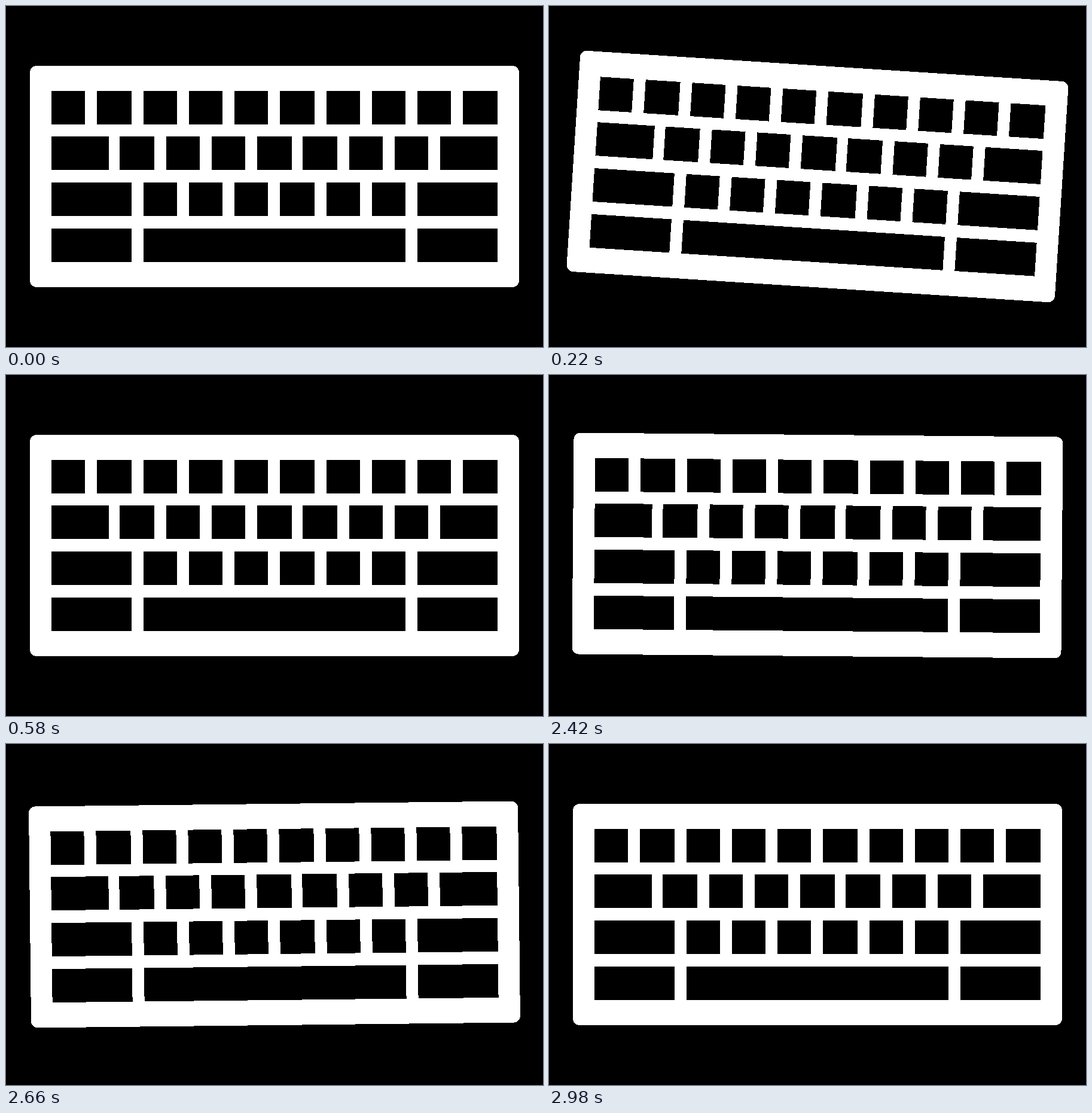
These frames come from a looping animation (898 by 570 pixels, 4060 ms). An HTML page:

```html
<!DOCTYPE html>
<html lang="en">
<head>
<meta charset="utf-8">
<title>Shaking keyboard</title>
<style>
  html, body { margin: 0; width: 100%; height: 100%; overflow: hidden; background: #000; }
  svg { display: block; width: 100%; height: 100%; shape-rendering: crispEdges; }
</style>
</head>
<body>
<svg viewBox="0 0 898 570">
  <g id="keyboard">
    <rect x="40" y="100" width="818" height="370" rx="11" fill="#fff"/>
    <path id="keys"/>
  </g>
</svg>
<script>
const LOOP = 4060, SHAKE_PERIOD = 2400, SHAKE_TIME = 588, STEP = 20;
const SWING = 5;

// Keys sit on a grid ten units wide; their sides snap to even pixels.
const LEFT = 76, TOP = 142, UNIT = 76.5, KEY_GAP = 19.7, KEY_HEIGHT = 56;
const UNITS = 10, ROWS = 4;
const snap = x => 2 * Math.round(x / 2);

function keyOutline(row, start, width) {
  const left = snap(LEFT + start * UNIT);
  const right = snap(LEFT + (start + width) * UNIT - KEY_GAP);
  const top = TOP + Math.floor(row * 76.7);
  return `M${left} ${top}H${right}v${KEY_HEIGHT}H${left}z`;
}

let outline = "";
for (let row = 0; row < ROWS; row++) {
  const side = Math.min(1 + row / 2, 2);
  const inner = row < ROWS - 1 ? 1 : UNITS - 2 * side;
  outline += keyOutline(row, 0, side) + keyOutline(row, UNITS - side, side);
  for (let start = side; start < UNITS - side; start += inner) {
    outline += keyOutline(row, start, inner);
  }
}
document.getElementById("keys").setAttribute("d", outline);

const bezier = (a, b, s) => 3 * a * s * (1 - s) ** 2 + 3 * b * s * s * (1 - s) + s ** 3;

// CSS "ease": cubic-bezier(.25, .1, .25, 1)
function ease(x) {
  let low = 0, high = 1;
  for (let i = 0; i < 30; i++) {
    const mid = (low + high) / 2;
    if (bezier(0.25, 0.25, mid) < x) low = mid; else high = mid;
  }
  return bezier(0.1, 1, low);
}

// Swing right, then left, then back to rest, each taking a third of the shake.
function angleAt(time) {
  const poses = [0, SWING, -SWING, 0];
  const position = (time % SHAKE_PERIOD) / SHAKE_TIME * 3;
  if (position >= 3) return 0;
  const i = Math.floor(position);
  return poses[i] + (poses[i + 1] - poses[i]) * ease(position - i);
}

const keyboard = document.getElementById("keyboard");
const start = performance.now();

function draw() {
  const time = (performance.now() - start) % LOOP;
  const angle = angleAt(Math.floor(time / STEP) * STEP);
  keyboard.setAttribute("transform", `rotate(${angle.toFixed(3)} 449 285)`);
  requestAnimationFrame(draw);
}
draw();
</script>
</body>
</html>
```
